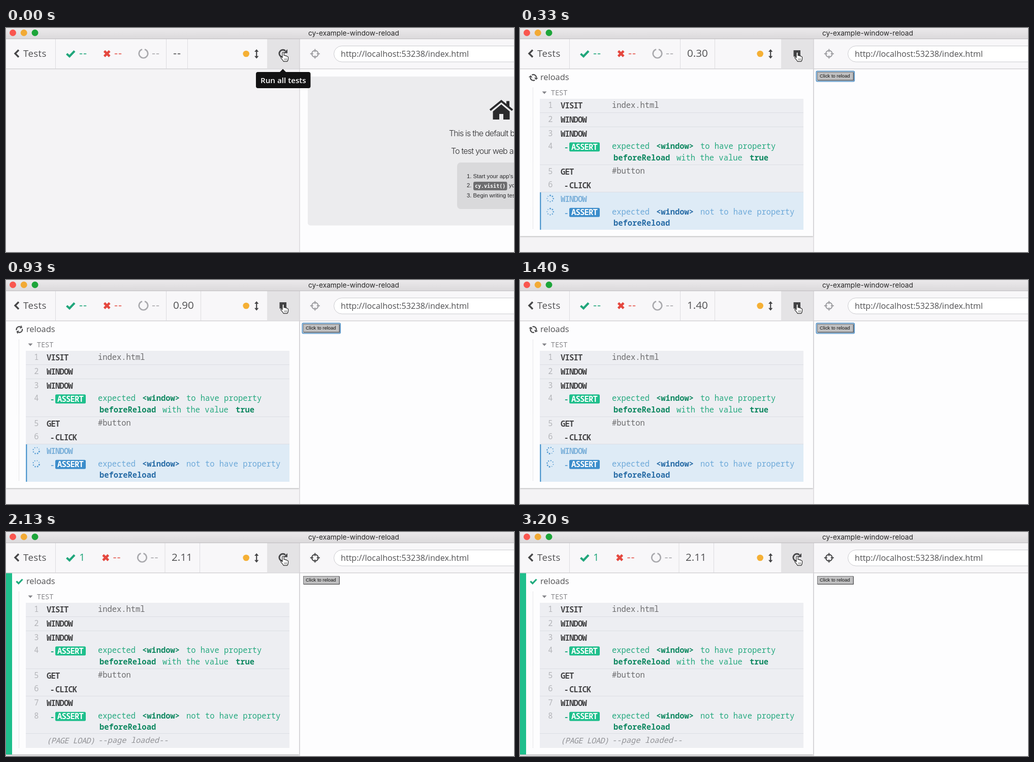
Write an HTML page that moves like this. It is 1000 px wide and 443 px high and loops after 3270 ms.

```html
<!DOCTYPE html>
<html lang="en">
<head>
<meta charset="utf-8">
<title>Test runner</title>
<style>
  html, body { margin: 0; width: 100%; height: 100%; overflow: hidden; background: #fdfdfe; }
  svg { display: block; width: 100vw; height: 100vh; }
  text { white-space: pre; }
  .ui { font-family: "Open Sans", sans-serif; fill: #505052; }
  .mono { font: 15.45px "Noto Sans Mono", monospace; fill: #6c6c6e; }
  .label { font: 600 15.6px "Noto Sans Mono", monospace; letter-spacing: -.86px; fill: #434345; }
  .num { fill: #b4b5b9; text-anchor: end; }
  .dash { font-size: 22px; letter-spacing: .9px; }
  .note { font: italic 15.4px "Noto Sans Mono", monospace; fill: #929397; }
  .green { fill: #25a97f; }
  .green.b { fill: #0f8861; font-weight: 600; }
  .blue { fill: #6da9d9; }
  .blue.b { fill: #286ca6; font-weight: 600; }
  .wait { fill: #7db1da; }
  .chip { fill: #fff; }
  .light { font: 300 16px Inter, sans-serif; letter-spacing: -.8px; fill: #2c2c2e; }
  .list { font: 11.3px "Liberation Sans", Arial, sans-serif; fill: #29292b; }
  .line { fill: none; }
</style>
</head>
<body>
<svg id="stage" viewBox="0 0 1000 443" preserveAspectRatio="none"></svg>
<script>
const LOOP = 3270, TICK = LOOP / 49;
const RUN = 1, TIMER = 2, CHECK = 3, PASS = 32;

const esc = s => s.replace(/&/g, '&amp;').replace(/</g, '&lt;');
const text = (x, y, s, cls = 'ui', more = '') => `<text x="${x}" y="${y}" class="${cls}" ${more}>${esc(s)}</text>`;
const rect = (x, y, w, h, fill, more = '') => `<rect x="${x}" y="${y}" width="${w}" height="${h}" fill="${fill}" ${more}/>`;
const dot = (x, y, r, fill) => `<circle cx="${x}" cy="${y}" r="${r}" fill="${fill}"/>`;
const fill = (d, color) => `<path d="${d}" fill="${color}"/>`;
const line = (d, color, w) => `<path class="line" d="${d}" stroke="${color}" stroke-width="${w}"/>`;
const group = (id, ...parts) => `<g id="${id}">${parts.join('')}</g>`;
const at = (x, y, body, id = '') => `<g transform="translate(${x} ${y})"><g class="${id}">${body}</g></g>`;

const rowBg = (y, h) => rect(39, y, 519, h, '#edeef2') + rect(39, y + h - 1, 519, 1, '#dcdee4');
const busyBg = (y, h) => rect(39, y, 519, h, '#deebf6') + rect(39.3, y, 2, h, '#3d8dc9');
const num = (n, y) => text(64.5, y, String(n), 'mono num');

const spinner = y => {
  let dots = '';
  for (let i = 0; i < 8; i++) {
    const a = i * Math.PI / 4 - 2.4;
    dots += dot(6.2 * Math.cos(a), 6.2 * Math.sin(a), 1.6 - i * .11, '#5c9fd4');
  }
  return at(59.5, y, dots, 'spin');
};

// An assertion: chip, first line and the bold property on the second line
const assertion = (y, verb, tone, chip) =>
  text(86.5, y + 2, '-', 'label ' + tone) +
  rect(97, y - 13, 60, 18, chip, 'rx="2.5"') + text(101, y + 1.5, 'ASSERT', 'label chip') +
  text(181, y, 'expected', 'mono ' + tone) + text(268, y, '<window>', `mono ${tone} b`) +
  text(355, y, verb + ' have property', 'mono ' + tone) +
  text(184, y + 22.5, 'beforeReload', `mono ${tone} b`);

const panel = (id, bottom, listEnd) => group(id,
  rect(0, 81, 577, bottom - 81, '#fdfdfe', 'filter="url(#shade)"'),
  `<path class="line" d="M25.5 118V${listEnd}" stroke="#cfcfd3" stroke-dasharray="1 1"/>`);

const click = (y, cls = '') => text(86.5, y, '-', 'label ' + cls) + text(97, y, 'CLICK', 'label ' + cls);

const defs = `<defs>
  <linearGradient id="bar" x2="0" y2="1"><stop stop-color="#ebe9eb"/><stop offset="1" stop-color="#dbd9db"/></linearGradient>
  <filter id="shade" x="-5%" y="-5%" width="110%" height="115%"><feDropShadow dx="0" dy="1" stdDeviation="1.1" flood-opacity=".36"/></filter>
</defs>`;

const home = group('home',
  rect(594, 96, 420, 294.5, '#ececee', 'rx="5"'),
  line('M953 162.5L975 144.5 997 162.5', '#2b2b2d', 4),
  fill('M985 144.5h6v13l-6-5Z', '#2b2b2d'),
  fill('M958.5 165L975 151 991.5 165V181H979V170H971V181H958.5Z', '#2b2b2d'),
  text(872, 214, 'This is the default blank page', 'light'),
  text(876, 249, 'To test your web app:', 'light'),
  rect(888, 266, 140, 92, '#d9d9db', 'rx="7"'),
  text(907, 297, "1. Start your app's server", 'list'),
  text(907, 315, '2.', 'list'),
  rect(920, 304, 66.5, 17, '#6d6d6f', 'rx="3"'),
  text(923, 315.5, 'cy.visit()', '', 'font-family="DejaVu Sans Mono, monospace" font-size="10" font-weight="700" fill="#fff"'),
  text(990, 315, 'your app', 'list'),
  text(907, 335, '3. Begin writing tests', 'list'));

const button = group('button',
  `<g id="focus">${rect(583.4, 85.4, 74.7, 20.2, 'none', 'rx="2" stroke="#5f98c8" stroke-width="2"')}</g>`,
  rect(585.5, 87.5, 70.5, 15.5, '#c0c0c1', 'stroke="#77777a"'),
  line('M586 103.5H656.5V88', '#555557', 1),
  text(590, 98.3, 'Click to reload', '', 'font-family="Liberation Sans, Arial, sans-serif" font-size="9.4" fill="#111"'));

const arrows = line('M-5.7-1.2A5.8 5.8 0 0 1 4.2-4', '#4c4c4e', 2.2) + fill('M6.8-6.6V-1H1.2Z', '#4c4c4e');

const runRows = group('run',
  text(40, 103, 'reloads', 'ui', 'font-size="16.4"'),
  fill('M43.5 125.5h9l-4.5 5Z', '#85858a'),
  text(61, 133, 'TEST', 'ui', 'font-size="14" letter-spacing=".4" style="fill:#808084"'),
  rowBg(140, 28), num(1, 158), text(80, 159, 'VISIT', 'label'), text(181, 158, 'index.html', 'mono'),
  rowBg(168, 28), num(2, 186), text(80, 187, 'WINDOW', 'label'),
  rowBg(196, 75), num(3, 214), text(80, 215, 'WINDOW', 'label'),
  num(4, 239), assertion(239.3, 'to', 'green', '#1fbf8c'),
  text(308, 261.8, 'with the value', 'mono green'), text(452, 261.8, 'true', 'mono green b'),
  rect(39, 271, 519, 26, '#edeef2'), num(5, 289), text(80, 290, 'GET', 'label'), text(181, 288, '#button', 'mono'));

const rows = runRows +
  group('busy', at(26.3, 98, arrows + `<g transform="rotate(180)">${arrows}</g>`, 'spin')) +
  group('clicking', busyBg(297, 27), spinner(310.3), click(316.5, 'wait')) +
  group('clicked', rowBg(297, 28), num(6, 315), click(316.5)) +
  group('checking', busyBg(325, 74), spinner(337.3), spinner(363.3),
    text(80, 343.5, 'WINDOW', 'label wait'), assertion(368.7, 'not to', 'blue', '#3c8dcb')) +
  group('passed',
    rect(0, 81, 12, 359, '#1fbf8c'),
    line('M20.5 97.5L24.8 101.7 32.5 93.5', '#20ab7e', 3.2),
    rowBg(325, 74), num(7, 343), text(80, 343.5, 'WINDOW', 'label'),
    num(8, 369), assertion(368.7, 'not to', 'green', '#1fbf8c'),
    rect(39, 399, 519, 28, '#edeef2'),
    text(80, 418, '(PAGE LOAD)', 'note', 'letter-spacing="-.65"'),
    text(181, 417, '--page loaded--', 'note'));

const toolbar =
  rect(0, 22, 1000, 59, '#f8f7f9') + rect(0, 80, 1000, 1.5, '#d3d2d5') +
  rect(514, 22, 64, 58.5, '#e4e3e5') + rect(97, 22, 1, 58, '#dddce0') +
  line('M25 43.5L18 50.5 25 57.5', '#464648', 3.4) +
  text(34, 57, 'Tests', 'ui', 'font-size="18.6" letter-spacing=".4"') +
  line('M119.5 51L125 56 135 45.5', '#20a67b', 4.2) +
  text(144, 57, '--', 'ui dash', 'id="good" style="fill:#20a67b"') +
  group('counts',
    line('M193.5 45.5l10.5 10.5m0-10.5l-10.5 10.5', '#e5483f', 4.6),
    text(213, 57, '--', 'ui dash', 'style="fill:#e5564d"'),
    line('M273 42.2A8.7 8.7 0 1 1 268 42.2', '#a9a9ad', 2.6),
    text(287, 57, '--', 'ui dash', 'style="fill:#a9a9ad"'),
    rect(315, 22, 1, 58, '#dddce0')) +
  text(329, 57, '--', 'ui dash', 'id="time"') +
  rect(357, 22, 1, 58, '#dddce0', 'id="edge"') +
  dot(472.7, 51, 6.3, '#f5b035') +
  line('M493.2 45V57.5', '#454547', 2.2) + fill('M493.2 42l4.2 5h-8.4ZM493.2 60.5l4.2-5h-8.4Z', '#454547') +
  group('again', line('M550.7 55A7.2 7.2 0 1 1 550 45.2', '#464648', 2.9), fill('M554 42v7.8h-7.8Z', '#464648')) +
  group('stop', rect(538.5, 44, 13.5, 12.5, '#434345')) +
  `<g id="target" stroke="#9d9da1" stroke-width="2" fill="none"><circle cx="608.3" cy="51" r="6.4"/>
   <path d="M608.3 41.5v6m0 7v6M598.8 51h6m7 0h6"/></g>` +
  rect(645.5, 35.5, 400, 31.5, '#fff', 'rx="15.7" stroke="#cbcbcf"') +
  text(659, 57, 'http://localhost:53238/index.html', 'ui', 'font-size="16.2"');

const tip = group('tip',
  fill('M545 81l7 7h-14Z', '#121213'), rect(492, 87, 107.5, 32, '#121213', 'rx="4"'),
  text(501, 109, 'Run all tests', 'ui', 'font-size="15.2" font-weight="600" style="fill:#fff"'));

const hand = `<path d="M544 57V49.5q0-1.7 1.6-1.7t1.6 1.7v5q3.2-.6 3.4.8 2.4-.5 2.8 1 2 0 2.2 1.8v3q0 2.5-2 5h-7.2q-1.5-2.4-5-6.4-1-1.6.4-2.2 1.2-.4 2.2 1Z"
  fill="#fff" stroke="#222" stroke-width="1.1"/>` + line('M548.3 60v4m2.2-4v4m2.2-4v4', '#555', .8);

const titlebar = rect(0, 0, 1000, 21, 'url(#bar)') + rect(0, 21, 1000, 1, '#bfbdc0') +
  dot(13.5, 9.5, 6.5, '#f9564f') + dot(35.2, 9.5, 6.5, '#f2aa35') + dot(57, 9.5, 6.5, '#1da53a') +
  text(595, 15, 'cy-example-window-reload', '', 'font-family="Inter, sans-serif" font-size="13.7" fill="#262626"');

document.getElementById('stage').innerHTML = defs +
  rect(0, 0, 1000, 443, '#fdfdfe') + rect(0, 81, 578, 362, '#f4f3f5') +
  panel('short', 336.5, 324) + panel('mid', 411.5, 398) + panel('tall', 440, 427) + rows +
  home + button + toolbar + rect(577.5, 22, 1, 421, '#c9c8cb') + titlebar + tip + hand;

const $ = id => document.getElementById(id);
const show = (on, ...ids) => ids.forEach(id => $(id).style.display = on ? '' : 'none');
const spins = document.querySelectorAll('.spin');

function setText(el, s, plain) {
  el.textContent = s;
  el.classList.toggle('dash', !plain);
  el.style.fontSize = plain ? '20.6px' : '';
}

function draw(ms) {
  const step = Math.floor((ms % LOOP + 7) / TICK) % 49;
  const t = step * TICK;
  const idle = step < RUN, pass = step >= PASS;
  const running = !idle && !pass, checking = running && step >= CHECK;
  const timed = step >= TIMER;

  show(idle, 'home', 'tip');
  show(!idle, 'run', 'button');
  show(running, 'busy', 'stop', 'focus');
  show(!running, 'again');
  show(running && !checking, 'short', 'clicking');
  show(checking, 'mid', 'checking');
  show(checking || pass, 'clicked');
  show(pass, 'tall', 'passed');

  setText($('good'), pass ? '1' : '--', pass);
  setText($('time'), pass ? '2.11' : timed ? (Math.floor(t / 100) / 10).toFixed(2) : '--', timed);
  $('time').setAttribute('x', pass ? 326 : 329);
  $('edge').setAttribute('x', pass ? 381 : timed ? 383 : 357);
  $('counts').setAttribute('transform', `translate(${pass ? -2.5 : 0})`);
  $('target').setAttribute('stroke', pass ? '#464648' : '#9d9da1');

  const angle = (t - TICK) * 360 / 2000;
  spins.forEach(el => el.setAttribute('transform', `rotate(${angle})`));
}

const start = performance.now();
function loop() {
  draw(performance.now() - start);
  requestAnimationFrame(loop);
}
loop();
</script>
</body>
</html>
```
